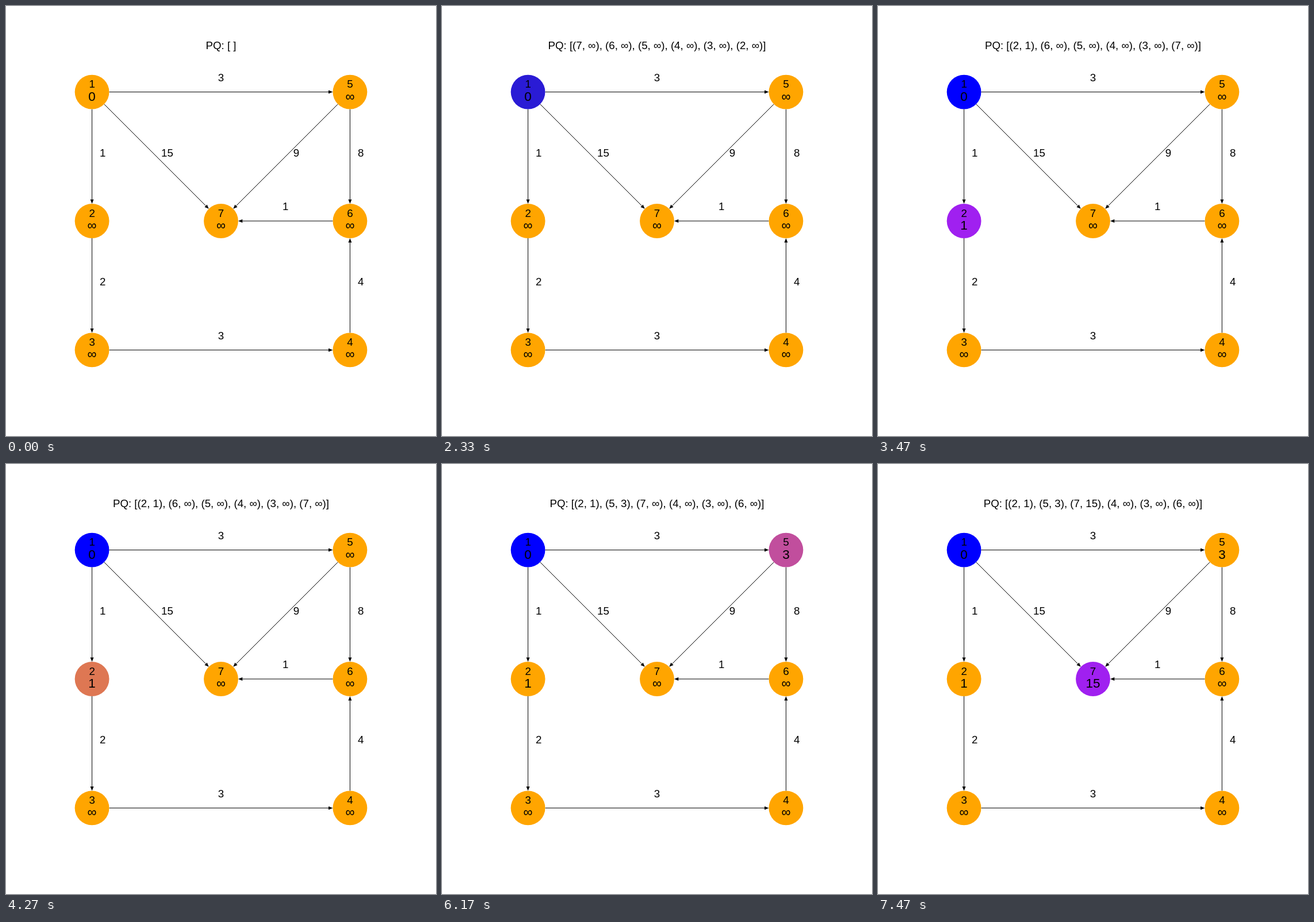
Recreate the animation shown at these times as an HTML page. Size 748 by 748 pixels, loop 8000 ms.

```html
<!DOCTYPE html>
<html lang="en">
<head>
<meta charset="utf-8">
<title>Shortest paths with a priority queue</title>
<style>
  html, body { margin: 0; width: 100%; height: 100%; overflow: hidden; background: #fff; }
  svg { display: block; width: 748px; height: 748px; }
  text { font: 18.7px "Liberation Sans", Arial, sans-serif; text-anchor: middle; fill: #000; }
  .dist { font-size: 22.44px; }
  line { stroke: #000; stroke-width: 1; }
</style>
</head>
<body>
<svg id="stage" viewBox="0 0 748 748"></svg>
<script>
const SIZE = 748, UNIT = SIZE / 40, R = SIZE * 0.04, HEAD = SIZE * 0.01;
const LOOP = 8000, FPS = 30, FADE = 500;
const ORANGE = [255, 165, 0], BLUE = [0, 0, 255], PURPLE = [160, 32, 240];

// Grid cells, node 1 first
const cells = [[0, 0], [0, 1], [0, 2], [2, 2], [2, 0], [2, 1], [1, 1]];
// from, to, weight, label offset in units
const edges = [
  [1, 2, 1, 1, 0], [1, 5, 3, 0, -1], [1, 7, 15, 1, 0], [2, 3, 2, 1, 0], [3, 4, 3, 0, -1],
  [4, 6, 4, 1, 0], [5, 6, 8, 1, 0], [5, 7, 9, 1, 0], [6, 7, 1, 0, -1]
];
// start time, node, from, to
const fades = [
  [1967, 1, ORANGE, BLUE], [2467, 2, ORANGE, PURPLE], [3967, 2, PURPLE, ORANGE],
  [4467, 5, ORANGE, PURPLE], [5967, 5, PURPLE, ORANGE], [6467, 7, ORANGE, PURPLE]
];
// time, node, distance
const updates = [[2966, 2, 1], [4966, 5, 3], [6966, 7, 15]];
// time, node order in the queue
const queues = [[966, "1654327"], [1466, "765432"], [3466, "265437"], [5466, "257436"], [7466, "257436"]];

const stage = document.getElementById("stage");

function add(tag, attrs, text) {
  const el = document.createElementNS("http://www.w3.org/2000/svg", tag);
  for (const key in attrs) el.setAttribute(key, attrs[key]);
  if (text !== undefined) el.textContent = text;
  return stage.appendChild(el);
}

const pos = cells.map(([cx, cy]) => ({ x: SIZE * (0.2 + 0.3 * cx), y: SIZE * (0.2 + 0.3 * cy) }));

for (const [from, to, weight, ox, oy] of edges) {
  const a = pos[from - 1], b = pos[to - 1];
  const len = Math.hypot(b.x - a.x, b.y - a.y);
  const ux = (b.x - a.x) / len, uy = (b.y - a.y) / len;
  const tip = { x: b.x - ux * R, y: b.y - uy * R };
  const base = { x: tip.x - ux * HEAD, y: tip.y - uy * HEAD };
  const wx = -uy * HEAD * 0.4, wy = ux * HEAD * 0.4;
  add("line", { x1: a.x + ux * R, y1: a.y + uy * R, x2: base.x, y2: base.y });
  add("path", { d: `M${tip.x} ${tip.y}L${base.x + wx} ${base.y + wy}L${base.x - wx} ${base.y - wy}Z` });
  add("text", { x: (a.x + b.x) / 2 + ox * UNIT, y: (a.y + b.y) / 2 + oy * UNIT }, weight);
}

const nodes = pos.map(({ x, y }, i) => {
  const disc = add("circle", { cx: x, cy: y, r: R });
  add("text", { x, y: y - UNIT * 0.4 }, i + 1);
  const dist = add("text", { x, y: y + UNIT * 0.8, class: "dist" });
  return { disc, dist };
});
const title = add("text", { x: SIZE / 2, y: SIZE * 0.1 });

const ease = p => 0.5 - Math.cos(Math.PI * p) / 2;
const mix = (a, b, p) => a.map((v, i) => Math.round(v + (b[i] - v) * p));
const setText = (el, s) => { if (el.textContent !== s) el.textContent = s; };

function draw(ms) {
  // The scene advances in whole 1/30 s ticks
  const t = Math.floor((ms + 4) * FPS / 1000) * 1000 / FPS;
  const dists = ["0", ...Array(6).fill("∞")];
  const colors = Array(7).fill(ORANGE);

  for (const [at, n, from, to] of fades)
    if (t >= at) colors[n - 1] = mix(from, to, ease(Math.min(1, (t - at) / FADE)));
  for (const [at, n, d] of updates)
    if (t >= at) dists[n - 1] = String(d);

  nodes.forEach(({ disc, dist }, i) => {
    disc.setAttribute("fill", `rgb(${colors[i]})`);
    setText(dist, dists[i]);
  });

  const queue = queues.filter(q => t >= q[0]).pop();
  const items = queue ? [...queue[1]].map(n => `(${n}, ${dists[n - 1]})`).join(", ") : " ";
  setText(title, `PQ: [${items}]`);
}

const start = performance.now();
function tick() {
  draw((performance.now() - start) % LOOP);
  requestAnimationFrame(tick);
}
draw(0);
requestAnimationFrame(tick);
</script>
</body>
</html>
```
